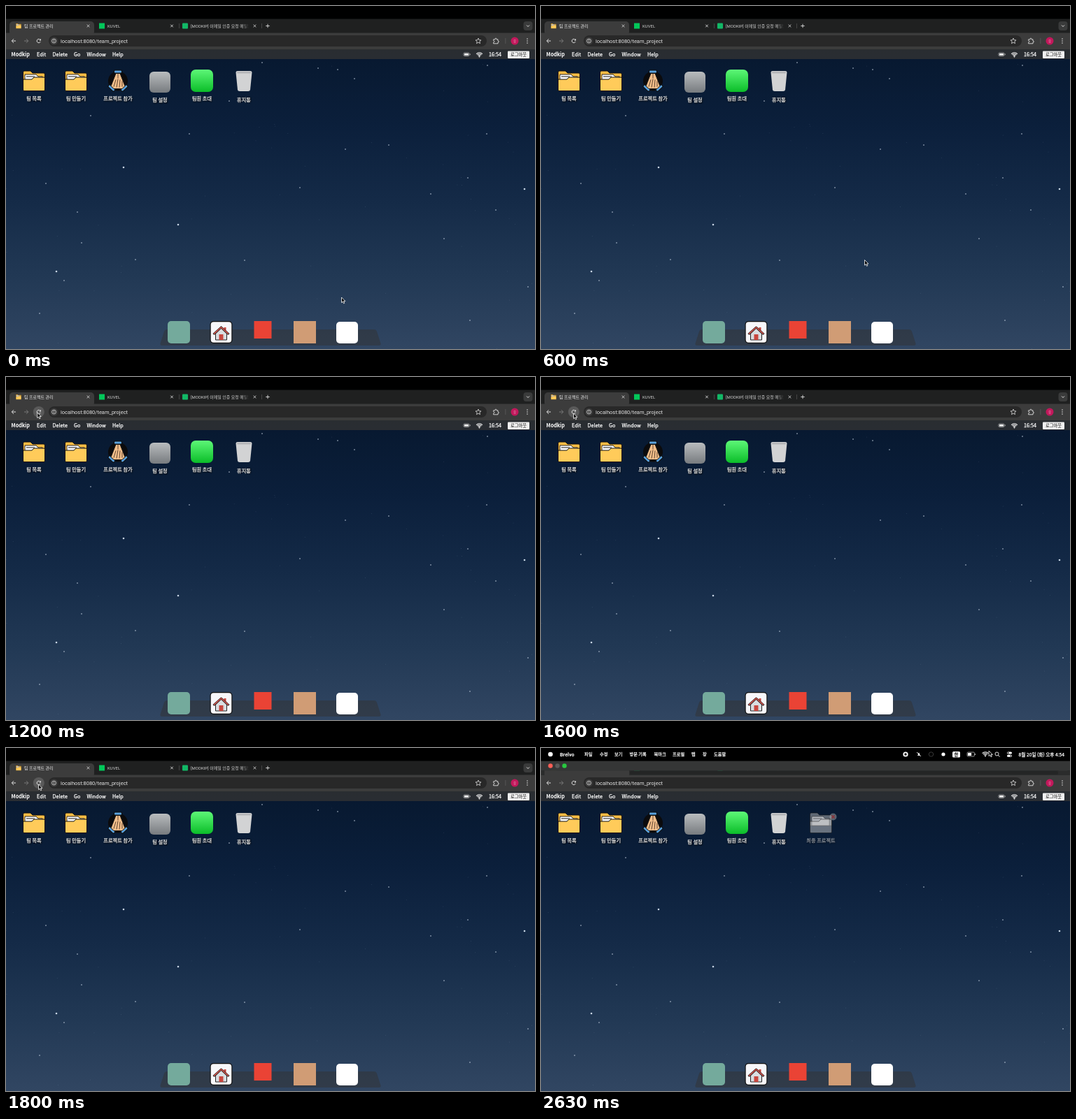
Write an HTML page with a canvas that moves like this. It is 756 px wide and 491 px high and loops after 2770 ms.

```html
<!DOCTYPE html>
<html lang="ko">
<head>
<meta charset="utf-8">
<title>Desktop</title>
<style>
html, body { margin: 0; width: 100%; height: 100%; overflow: hidden; background: #000; }
canvas { display: block; }
</style>
</head>
<body>
<canvas id="stage" width="756" height="491"></canvas>
<script>
const ctx = document.getElementById('stage').getContext('2d');
const LOOP = 2770;
const CJK = '"Noto Sans CJK KR", "Noto Sans CJK", "Noto Sans", sans-serif';
const UI = 'Roboto, "Noto Sans CJK KR", "Noto Sans CJK", sans-serif';

// Keyframes: time followed by values
const cursorPath = [[0, 479.5, 417], [300, 478, 412], [600, 462.5, 363.5], [700, 250, 160], [800, 32, 3],
  [900, 29.5, 38.5], [1100, 43, 50], [1300, 46.5, 52], [1900, 46.5, 52], [2200, 330, 110], [2400, 560, 60], [2500, 625, 4], [2630, 640, 4]];
const menuReveal = [[700, 0], [800, 1], [900, 1], [1100, 0], [2400, 0], [2500, .7], [2630, 1]];
const titleReveal = [[700, 0], [800, .8], [900, .75], [1100, 0], [2400, 0], [2500, .5], [2630, 1]];

function track(keys, t) {
  const i = Math.max(1, keys.findIndex(k => k[0] >= t));
  const a = keys[i - 1], b = keys[i], p = (t - a[0]) / (b[0] - a[0]);
  return a.slice(1).map((v, n) => v + (b[n + 1] - v) * p);
}

function rect(x, y, w, h, fill, r = 0) {
  ctx.fillStyle = fill;
  ctx.beginPath();
  ctx.roundRect(x, y, w, h, r);
  ctx.fill();
}
function dot(x, y, r, fill) {
  ctx.fillStyle = fill;
  ctx.beginPath();
  ctx.arc(x, y, r, 0, 7);
  ctx.fill();
}
function ring(x, y, r, color, width = 1, from = 0, to = 2 * Math.PI) {
  ctx.strokeStyle = color;
  ctx.lineWidth = width;
  ctx.beginPath();
  ctx.arc(x, y, r, from, to);
  ctx.stroke();
}
function path(d, x, y, fill, stroke, width = 1) {
  const p = new Path2D(d);
  ctx.save();
  ctx.translate(x, y);
  if (fill) { ctx.fillStyle = fill; ctx.fill(p); }
  if (stroke) { ctx.strokeStyle = stroke; ctx.lineWidth = width; ctx.stroke(p); }
  ctx.restore();
}
// Weight 500 is thickened with a hairline, as the installed face has no medium cut.
function text(s, x, y, size, { color = '#fff', weight = 400, font = CJK, align = 'left' } = {}) {
  ctx.font = `${weight} ${size}px ${font}`;
  ctx.textAlign = align;
  ctx.fillStyle = ctx.strokeStyle = color;
  ctx.fillText(s, x, y);
  if (weight === 500) {
    ctx.lineWidth = .25;
    ctx.strokeText(s, x, y);
  }
}
function vertical(y0, y1, ...colors) {
  const g = ctx.createLinearGradient(0, y0, 0, y1);
  colors.forEach((c, i) => g.addColorStop(i / (colors.length - 1), c));
  return g;
}
const cross = (x, y, r, color, width) => path(`M${-r} ${-r}L${r} ${r}M${r} ${-r}L${-r} ${r}`, x, y, null, color, width);

function wifi(x, y) {
  for (const r of [2.2, 4.2, 6.2]) ring(x, y, r, '#fff', 1.1, -Math.PI * .75, -Math.PI * .25);
  dot(x, y - .4, .9, '#fff');
}
function battery(x, y, w, h, level) {
  ctx.strokeStyle = '#ccc';
  ctx.lineWidth = .7;
  ctx.beginPath();
  ctx.roundRect(x, y, w, h, 1.4);
  ctx.stroke();
  rect(x + 1, y + 1, (w - 2) * level, h - 2, '#fff', .6);
  rect(x + w + .7, y + h / 2 - 1, .8, 2, '#ccc');
}

function folder(x, y, scale = 1, body = '#ffcb5a', back = '#fbbd45', paper = '#fff') {
  ctx.save();
  ctx.translate(x, y);
  ctx.scale(scale, scale);
  ctx.lineJoin = 'round';
  path('M-15.5-12Q-15.5-14-14-14H-5L-2-11H14Q15.5-11 15.5-9V4H-15.5Z', 0, 0, back, '#111', 1);
  path('M-13-9H3L6-6H12V4H-13Z', 0, 0, paper, '#111', .9);
  path('M-11-6H1', 0, 0, null, '#111', 1);
  path('M-15.5-2H-3L0-5H14Q15.5-5 15.5-3.5V13Q15.5 14.5 14 14.5H-14Q-15.5 14.5-15.5 13Z', 0, 0, body, '#111', 1);
  ctx.restore();
}

function hands(x, y) {
  dot(x, y, 14, '#0b0b0d');
  for (const turn of [0, 2.4, -2.4]) {
    ctx.save();
    ctx.translate(x, y);
    ctx.rotate(turn);
    rect(-6, -16, 12, 5, '#111', 1);
    rect(-5, -15, 10, 3, '#5aa3e0', 1);
    ctx.restore();
  }
  path('M-3-11H3L10 7L6 11H-6L-10 7Z', x, y, '#f3bf8b', '#111', 1);
  path('M0-11V-4M-3-2L-6 8M0-3L-2 9M3-2L2 9M6 0L6 8', x, y, null, '#3a261a', .8);
}

function trash(x, y) {
  const side = ctx.createLinearGradient(x - 12, 0, x + 12, 0);
  ['#d2d3d4', '#ececec', '#e2e2e3', '#c4c5c7'].forEach((c, i) => side.addColorStop(i / 3, c));
  path('M-11.5-12Q-11.5-14-9-14H9Q11.5-14 11.5-12L9 13Q8.7 15 6 15H-6Q-8.7 15-9 13Z', x, y, side);
  rect(x - 10, y - 13, 20, 2.4, '#b4b5b8', 1.2);
}

function house(x, y) {
  rect(x - 16, y - 16, 32, 32, '#111', 5);
  rect(x - 14.8, y - 14.8, 29.6, 29.6, '#f7f7fa', 4);
  rect(x + 4, y - 7, 3, 6, '#c8473f');
  path('M-8 2L0-6L8 2V11H-8Z', x, y, '#d9dde0', '#222', 1);
  path('M-11 3L0-7L11 3', x, y, null, '#222', 3);
  path('M-10.4 2.4L0-7L10.4 2.4', x, y, null, '#d5534b', 1.6);
  rect(x - 3, y + 3, 6, 8, '#c8473f');
}

const stars = [168,231, 246,313, 72,380, 741,262, 57,254, 102,295, 121,157, 262,183, 319,136, 420,260, 485,205,
  547,199, 660,246, 687,183, 607,269, 626,333, 688,85, 446,89, 474,91, 498,104, 700,292, 746,402, 663,450,
  185,363, 341,364, 48,440, 83,393, 108,339, 366,81];

function wallpaper() {
  rect(0, 62, 756, 429, vertical(62, 491, '#07182f', '#0b1f3b', '#142a47', '#213854', '#314662'));
  let seed = 11;
  const random = () => (seed = seed * 16807 % 2147483647) / 2147483647;
  for (let i = 0; i < 60; i++) dot(random() * 756, 76 + random() * 415, .5, 'rgba(190,210,235,.16)');
  for (let i = 0; i < stars.length; i += 2) {
    const bright = i < 8;
    dot(stars[i], stars[i + 1], bright ? 1.3 : .95, `rgba(220,232,245,${bright ? .9 : .55})`);
  }
}

function label(s, x, y) {
  ctx.save();
  ctx.shadowColor = '#000';
  ctx.shadowBlur = 2;
  ctx.shadowOffsetX = ctx.shadowOffsetY = .6;
  text(s, x, y, 7.2, { weight: 500, align: 'center' });
  ctx.restore();
}

function desktop(loading, hasProject) {
  if (loading) rect(0, 62, 756, 429, '#fff');
  else wallpaper();

  rect(0, 62, 756, 14, 'rgba(51,51,51,.8)');
  text('Modkip', 7.5, 72, 7.2, { weight: 700 });
  [['Edit', 44], ['Delete', 66.5], ['Go', 97], ['Window', 115.5], ['Help', 152]]
    .forEach(([s, x]) => text(s, x, 72, 7.2, { weight: 500 }));
  const shift = loading ? 49 : 0;
  battery(654 + shift, 67, 8, 4.5, 1);
  wifi(676.5 + shift, 73);
  if (!loading) {
    text('16:54', 690, 72, 7.2, { weight: 500 });
    rect(717, 64.5, 31, 10.5, '#f0f0f0', 1);
    text('로그아웃', 732.5, 72, 6.3, { color: '#111', align: 'center' });
  }

  folder(40, 107);
  folder(100, 107);
  if (!loading) {
    hands(160, 107.5);
    rect(205, 94, 30, 30, vertical(94, 124, '#b9bcbe', '#777b7f'), 6);
    rect(264, 91, 32, 32, vertical(91, 123, '#5df777', '#0bbd29'), 7);
    trash(340, 107);
  }
  ['팀 목록', '팀 만들기', '프로젝트 참가', '팀 설정', '팀원 초대', '휴지통'].forEach((s, i) =>
    label(s, 40 + 60 * i, 135.3 + (loading ? 0 : [0, 0, 0, 2, 0, 1.3][i])));
  if (hasProject) {
    ctx.globalAlpha = .5;
    folder(400, 107, 1, '#c9c9c9', '#b8b8b8');
    dot(417.5, 98.5, 5, '#aaa');
    cross(417.5, 98.5, 2.2, '#c00000', 1.4);
    label('최종 프로젝트', 400, 135.3);
    ctx.globalAlpha = 1;
  }

  path('M230 463H526Q529 463 530 466L535.5 483Q536 486 533 486H223Q220 486 220.5 483L226 466Q227 463 230 463Z',
    0, 0, 'rgba(51,51,51,.5)');
  rect(231, 451, 32, 32, '#74aa9c', 5);
  if (!loading) house(307.5, 467);
  rect(354.5, 451, 25, 25, '#ea4335');
  rect(411, 451, 32, 32, '#d09c75');
  rect(472, 452, 31, 31, '#fff', 5);
}

function tab(x, title, closeX, color) {
  const start = x + 12, fade = ctx.createLinearGradient(closeX - 18, 0, closeX - 8, 0);
  fade.addColorStop(0, color);
  fade.addColorStop(1, 'rgba(200,200,200,0)');
  ctx.save();
  ctx.beginPath();
  ctx.rect(start, 22, closeX - 8 - start, 14);
  ctx.clip();
  text(title, start, 30.7, 6, { color: fade, font: UI });
  ctx.restore();
  cross(closeX, 28.5, 1.8, '#ddd', .9);
}

function browser(hover) {
  rect(0, 18, 756, 21, '#1f2020');
  rect(5, 22, 121, 20, '#3c3c3c', 5);
  rect(0, 38.5, 756, 23.5, '#3c3c3c');
  folder(18, 28.5, .25);
  rect(133, 24.5, 8, 8, '#03c75a');
  rect(252, 24.5, 8, 8, '#12b866', 1);
  tab(14, '팀 프로젝트 관리', 117.5, '#eee');
  tab(133, 'KUVEL', 237, '#ccc');
  tab(252, '[MODKIP] 이메일 인증 요청 메일입니다', 355.5, '#ccc');
  for (const x of [247, 365]) rect(x, 25, .7, 7, '#555');
  path('M-2.7 0H2.7M0-2.7V2.7', 374, 28.5, null, '#ddd', .9);
  rect(739.5, 22, 13, 13, '#3a3b3b', 4);
  path('M-2-1L0 1L2-1', 746, 28.5, null, '#ddd', 1);

  path('M3 0H-2.7M0-2.8L-2.8 0L0 2.8', 11, 50, null, '#ddd', 1);
  path('M-3 0H2.7M0-2.8L2.8 0L0 2.8', 29, 50, null, '#777', 1);
  if (hover) dot(46.8, 50, 8, '#5a5a5a');
  ring(46.8, 50, 2.7, '#ddd', 1, .4, 5.5);
  path('M3.2-3.2V-.5H.5Z', 46.8, 50, '#ddd');

  rect(61, 42, 626, 16, '#282828', 8);
  dot(68.5, 50, 5.5, '#3c3c3c');
  ring(68.5, 50, 2.9, '#ddd', .8);
  rect(68.1, 49.5, .8, 2.1, '#ddd');
  rect(68.1, 48.1, .8, .8, '#ddd');
  text('localhost:8080/team_project', 78, 52.5, 7.5, { color: '#e3e3e3', font: UI });
  path('M0-4L1.1-1.3L4-1.1L1.8.8L2.5 3.6L0 2.1L-2.5 3.6L-1.8.8L-4-1.1L-1.1-1.3Z', 675, 50, null, '#ddd', .8);
  path('M-3.3-2.2H-1Q-1-4 0-4Q1-4 1-2.2H3V0Q4.4 0 4.4 1Q4.4 2 3 2V3.8H-3.3V2Q-2 1.8-2 .8Q-2-.2-3.3-.3Z', 700, 50, null, '#ddd', .9);
  rect(713.5, 46, .8, 8, '#5a5a5a');
  dot(727, 50, 5.5, '#c2185b');
  text('우', 727, 51.6, 4.5, { color: '#f3c3d6', align: 'center' });
  for (const y of [47, 50, 53]) dot(745, y, .8, '#ddd');
}

function titleBar(reveal) {
  const y = 18.5 - 14 * (1 - reveal);
  rect(0, y, 756, 14, '#353636');
  if (reveal === 1) {
    rect(0, 32.5, 756, 6, '#2b2c2c');
    rect(5, 32.5, 121, 6.5, '#3c3c3c');
    rect(127, 33, 612, 5, '#242525', 2);
  }
  ['#ff5f57', '#5b5b5b', '#28c840'].forEach((c, i) => dot(13.5 + 10 * i, y + 7, 3.2, c));
}

function systemMenu(reveal) {
  ctx.save();
  ctx.translate(0, -18 * (1 - reveal));
  dot(13.5, 9, 3.3, '#fff');
  text('Brelvo', 27, 11.6, 7.2, { weight: 700, font: UI });
  [['파일', 62], ['수정', 84], ['보기', 105], ['방문 기록', 126.5], ['북마크', 161.5], ['프로필', 188], ['탭', 215], ['창', 231], ['도움말', 247]]
    .forEach(([s, x]) => text(s, x, 11.4, 6.2, { weight: 500 }));
  dot(521, 9, 3.6, '#fff');
  rect(519.5, 7.5, 3, 3, '#000', .5);
  path('M-2 2H2Q1 0 1-1Q0-4-1-1Q-1 0-2 2Z', 540, 9, '#ddd');
  path('M-3-3L3 3', 540, 9, null, '#fff', .9);
  ring(557.5, 9, 3.2, '#3a3a3a');
  dot(575, 9, 2.6, '#fff');
  rect(588, 5, 11, 8.5, '#fff', 1.5);
  text('한', 593.5, 11.6, 6.3, { color: '#000', weight: 700, align: 'center' });
  battery(609, 6, 10.5, 6, .6);
  wifi(635, 12);
  ring(651.5, 8.5, 2.5, '#fff', .9);
  path('M1.8 1.8L4 4', 651.5, 8.5, null, '#fff', 1);
  rect(666, 5.5, 7, 3, '#fff', 1.5);
  rect(666, 9.8, 7, 3, '#fff', 1.5);
  dot(667.6, 7, .9, '#000');
  dot(671.4, 11.3, .9, '#000');
  text('8월 20일 (화) 오후 4:54', 748, 11.5, 6.7, { weight: 500, align: 'right' });
  ctx.restore();
}

function render(t) {
  const [x, y] = track(cursorPath, t), [menu] = track(menuReveal, t), [title] = track(titleReveal, t);
  desktop(t === 1700, t >= 1900);
  browser(Math.hypot(x - 46.8, y - 50) < 8);
  if (title) titleBar(title);
  rect(0, 0, 756, 18.5, '#000');
  if (menu) systemMenu(menu);
  ctx.lineJoin = 'round';
  path('M0 0V7.6L1.8 6L3 8.8L4.3 8.2L3.1 5.5H5.4Z', x, y, '#000', '#fff', .8);
}

let shown = -1;
function tick() {
  const now = performance.now() % LOOP;
  const t = now >= 2630 ? 2630 : Math.min(2500, Math.floor(now / 100) * 100);
  if (t !== shown) render(shown = t);
  requestAnimationFrame(tick);
}
tick();
</script>
</body>
</html>
```
